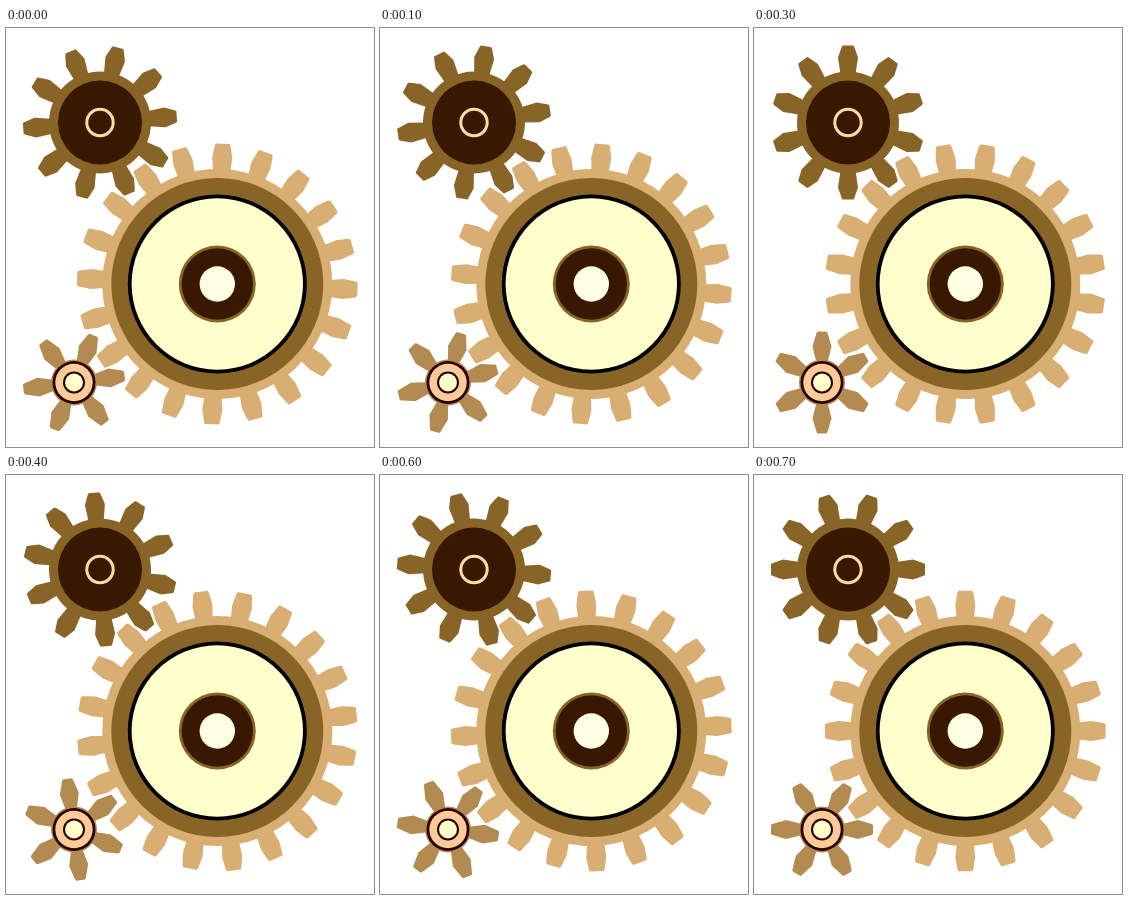
An HTML page that plays this animation: 368x419 px, repeating every 800 ms.

```html
<!DOCTYPE html>
<html lang="en">
<head>
<meta charset="utf-8">
<title>Gears</title>
<style>
  html, body { margin: 0; width: 100%; height: 100%; overflow: hidden; background: #fff; }
  svg { display: block; width: 100vw; height: 100vh; }
</style>
</head>
<body>
<svg id="stage" viewBox="0 0 368 419"></svg>
<script>
const stage = document.getElementById('stage');
const STEP = 100, STEPS = 8;

// profile: [radius, half width] pairs along one tooth, from root to tip.
// discs: [radius, colour] pairs, outermost first.
const gears = [
  {
    x: 94, y: 94.5, teeth: 10, turn: -1, offset: 3, body: 51, color: '#896427',
    profile: [[48, 7.5], [65, 10], [75, 6.5], [77, 5.5]],
    discs: [[42, '#381800'], [14.7, '#ffdca0'], [11.7, '#381800']]
  },
  {
    x: 68, y: 354.5, teeth: 6, turn: -1, offset: 3, body: 23, color: '#b38a4f',
    profile: [[20, 5.5], [36, 9.5], [49.5, 5.5], [51, 4.5]],
    discs: [[21.5, '#280000'], [18.7, '#fccb98'], [11, '#280000'], [9, '#ffffcc']]
  },
  {
    x: 211.3, y: 256, teeth: 20, turn: 1, offset: -1, body: 115, color: '#d8ae72',
    profile: [[112, 8.5], [126, 10], [138, 8], [140.3, 7]],
    discs: [
      [106, '#896427'], [89.5, '#000'], [85.7, '#ffffcc'],
      [38.5, '#896427'], [35.7, '#381800'], [17.7, '#ffffe4']
    ]
  }
];

function add(parent, tag, attrs) {
  const node = document.createElementNS('http://www.w3.org/2000/svg', tag);
  for (const key in attrs) node.setAttribute(key, attrs[key]);
  return parent.appendChild(node);
}

function build(gear) {
  const group = add(stage, 'g', { transform: `translate(${gear.x} ${gear.y})` });
  gear.wheel = add(group, 'g', { fill: gear.color });
  add(gear.wheel, 'circle', { r: gear.body });
  const left = gear.profile.map(([r, w]) => [-w, -r]);
  const right = gear.profile.map(([r, w]) => [w, -r]).reverse();
  const points = left.concat(right).join(' ');
  for (let i = 0; i < gear.teeth; i++) {
    add(gear.wheel, 'polygon', { points, transform: `rotate(${i * 360 / gear.teeth})` });
  }
  for (const [r, fill] of gear.discs) add(group, 'circle', { r, fill });
}

// Each loop turns every gear by exactly one tooth.
function draw(time) {
  const step = Math.floor(time / STEP) % STEPS;
  for (const gear of gears) {
    const angle = gear.turn * (step - gear.offset) * 360 / gear.teeth / STEPS;
    gear.wheel.setAttribute('transform', `rotate(${angle})`);
  }
}

gears.forEach(build);
draw(0);
const start = performance.now();
function tick() {
  draw(performance.now() - start);
  requestAnimationFrame(tick);
}
requestAnimationFrame(tick);
</script>
</body>
</html>
```
